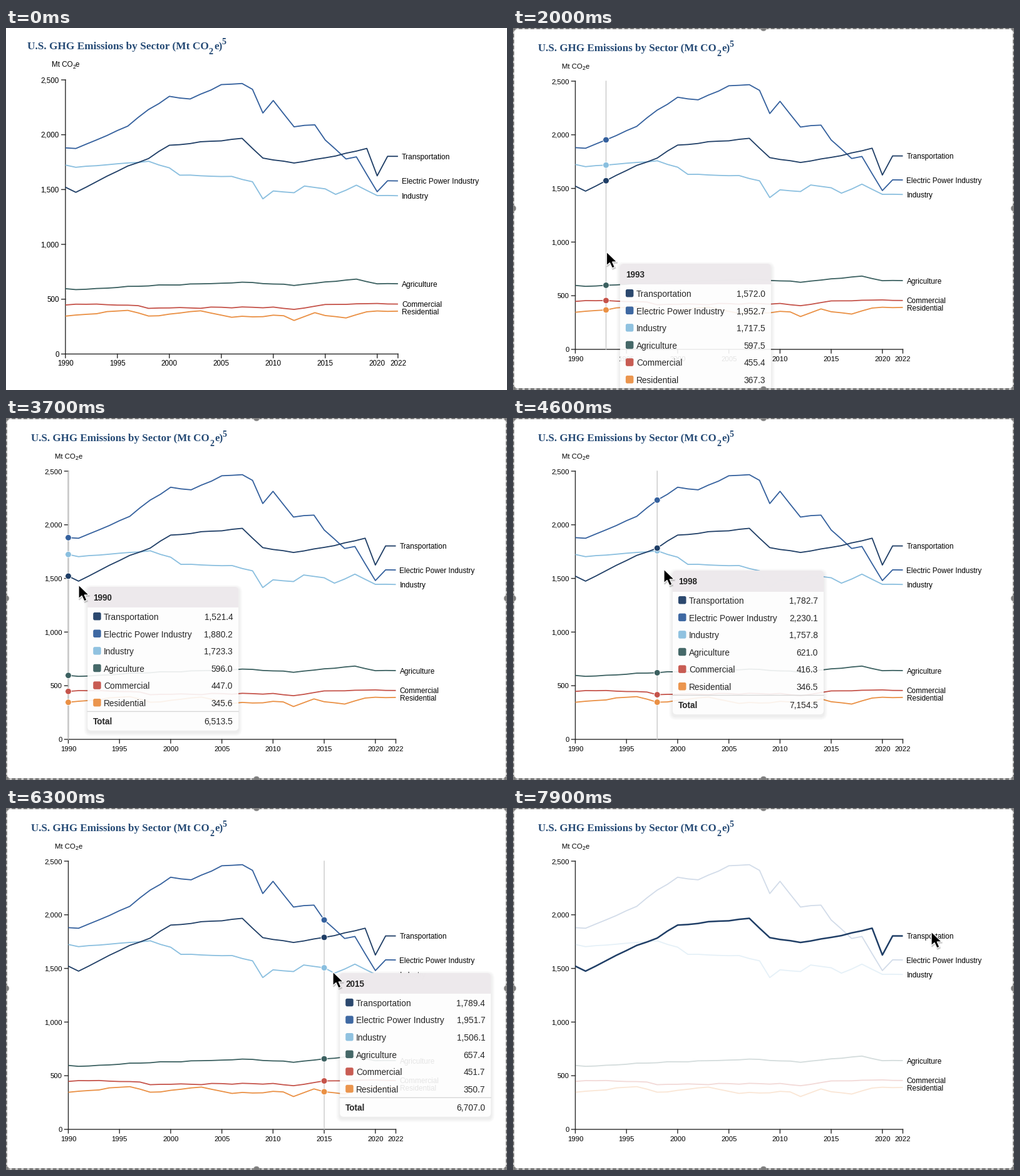
Write a matplotlib script that moves like this. It is 800 px wide and 579 px high and loops after 8 s.

```python
import numpy as np
import matplotlib.pyplot as plt
from matplotlib.animation import FuncAnimation
from matplotlib.patches import Circle, FancyBboxPatch, Polygon, Rectangle

W, H, DPI = 800, 579, 64
PT = 72 / DPI                      # points per pixel
FRAMES, STEP = 80, 100
LEFT, RIGHT, TOP, BOTTOM = 99.5, 622.5, 85, 514
FIRST, LAST = 1990, 2022
YEARS = np.arange(FIRST, LAST + 1)
SANS, SERIF = "Liberation Sans", "Liberation Serif"
rng = np.random.default_rng(5)


def trend(turns):
    """Straight runs between {year: value} turning points, slightly rough in between."""
    values = np.interp(YEARS, list(turns), list(turns.values()))
    rough = rng.normal(0, 3, len(YEARS))
    return np.where(np.isin(YEARS, list(turns)), values, values + rough)


SERIES = [
    ("Transportation", "#1f3e66", trend({
        1990: 1521.4, 1991: 1474.8, 1996: 1714.6, 1998: 1782.73, 2000: 1904, 2007: 1967,
        2009: 1787, 2012: 1742, 2015: 1789.4, 2019: 1875, 2020: 1625, 2021: 1803})),
    ("Electric Power Industry", "#34609d", trend({
        1990: 1880.2, 1991: 1874.4, 1996: 2078.4, 1998: 2230.13, 2000: 2350, 2002: 2326,
        2005: 2457, 2007: 2467, 2008: 2414, 2009: 2198, 2010: 2312, 2012: 2072,
        2014: 2090, 2015: 1951.7, 2017: 1779, 2018: 1798, 2020: 1480, 2021: 1580})),
    ("Industry", "#8abfdf", trend({
        1990: 1723.3, 1991: 1702.9, 1998: 1757.8, 2000: 1698, 2001: 1631, 2006: 1620,
        2008: 1571, 2009: 1415, 2010: 1487, 2012: 1471, 2013: 1532, 2015: 1506.1,
        2016: 1456, 2018: 1540, 2020: 1445})),
    ("Agriculture", "#3b6060", trend({
        1990: 596, 1991: 587.4, 1998: 621, 2007: 655, 2012: 625, 2015: 657.4,
        2018: 683, 2020: 640})),
    ("Commercial", "#c5534a", trend({
        1990: 447, 1991: 454.4, 1997: 441, 1998: 416.3, 2010: 428, 2012: 407,
        2015: 451.7, 2019: 459})),
    ("Residential", "#ea9044", trend({
        1990: 345.6, 1991: 355.3, 1996: 398, 1998: 346.5, 2003: 394, 2006: 335,
        2011: 349, 2012: 306, 2014: 377, 2015: 350.7, 2017: 329, 2019: 385, 2022: 391})),
]

# Where the pointer comes to rest: (time, x, y)
STOPS = [(800, 222, 521), (2600, 124, 301), (2700, 124, 301), (3700, 116, 267),
         (4500, 241, 242), (4600, 241, 242), (6300, 522, 262), (7900, 668, 198)]
TOOLTIP_OFFSET = np.array([14, 2])
ARROW = np.array([(0, 0), (0, 22), (5, 17.5), (9, 26), (13, 24.3), (9.3, 16), (16.5, 16)])

fig = plt.figure(figsize=(W / DPI, H / DPI), dpi=DPI, facecolor="white")
ax = fig.add_axes([0, 0, 1, 1])
zoom = 1.0


def pointer_at(t):
    """Ease in and out between neighbouring stops."""
    t = max(t, STOPS[0][0])
    for (t0, *start), (t1, *end) in zip(STOPS, STOPS[1:]):
        if t <= t1:
            break
    u = min((t - t0) / (t1 - t0), 1)
    return np.array(start) + (np.array(end) - start) * u * u * (3 - 2 * u)


def px(year):
    return LEFT + (year - FIRST) * (RIGHT - LEFT) / (LAST - FIRST)


def py(value):
    return BOTTOM - np.asarray(value) * (BOTTOM - TOP) / 2500


def line(xs, ys, color, width, **kw):
    ax.plot(xs, ys, color=color, lw=width * PT * zoom, snap=False, **kw)


def text(x, y, string, size=11.4, color="black", font=SANS, **kw):
    """Place text with the middle of its capitals at y."""
    ax.text(x, y + 0.36 * size, string, fontsize=size * PT * zoom, color=color,
            fontfamily=font, va="baseline", **kw)


def rounded(x, y, w, h, r, **kw):
    box = FancyBboxPatch((x + r, y + r), w - 2 * r, h - 2 * r,
                         boxstyle=f"round,pad={r}", **kw)
    return ax.add_patch(box)


def draw_title():
    style = dict(color="#254a75", font=SERIF, weight="bold")
    text(40, 31.3, "U.S. GHG Emissions by Sector (Mt CO", 17, **style)
    text(325, 39.5, "2", 14, **style)
    text(333, 31.3, "e)", 17, **style)
    text(345.5, 24.5, "5", 14, **style)
    text(78, 60.7, "Mt CO")
    text(110.5, 64, "2", 8.5)
    text(115, 60.7, "e")


def draw_axes():
    ink = "#2b2b2b"
    line([LEFT, LEFT], [TOP, BOTTOM], ink, 1.4)
    line([LEFT, RIGHT], [BOTTOM, BOTTOM], ink, 1.4)
    for value in range(0, 2501, 500):
        line([LEFT - 6, LEFT], [py(value)] * 2, ink, 1.4)
        text(LEFT - 10, py(value), f"{value:,}", ha="right")
    for year in [*range(FIRST, LAST, 5), LAST]:
        line([px(year)] * 2, [BOTTOM, BOTTOM + 6], ink, 1.4)
        text(px(year), BOTTOM + 14.5, str(year), ha="center")


def draw_series(active=None):
    for name, color, values in reversed(SERIES):
        strong = name == active
        line(px(YEARS), py(values), color, 2.5 if strong else 1.8,
             zorder=3 if strong else 2, alpha=0.22 if active and not strong else 1,
             solid_joinstyle="round", solid_capstyle="butt")
        text(RIGHT + 6, py(values[-1]) + 0.4, name, 11.8)


def draw_marker(year):
    x = px(year)
    line([x, x], [TOP, BOTTOM], "#c9c9c9", 1.4, zorder=2.5)
    for _, color, values in reversed(SERIES):
        ax.add_patch(Circle((x, py(values[year - FIRST])), 4.9, fc=color, ec="white",
                            lw=0.9 * PT, zorder=4))


def draw_tooltip(x, y, year):
    w, h = 241, 230
    for grow in range(6, 0, -1):
        rounded(x - grow, y - grow + 3, w + 2 * grow, h + 2 * grow, 5 + grow,
                fc="black", ec="none", alpha=0.01, zorder=5)
    body = rounded(x, y, w, h, 6, fc="white", ec="none", alpha=0.9, zorder=5.1)
    header = Rectangle((x, y), w, 33.5, fc="#ece8eb", ec="none", alpha=0.93, zorder=5.2)
    ax.add_patch(header)
    header.set_clip_path(body)

    ink = dict(color="#262626", zorder=6)
    text(x + 9, y + 17, str(year), 13.5, weight="bold", **ink)
    for i, (name, color, values) in enumerate(SERIES):
        row = y + 48 + 27.6 * i
        rounded(x + 9, row - 7, 12.5, 12.5, 2.5, fc=color, ec="none", alpha=0.95, zorder=6)
        text(x + 26, row, name, 13.8, **ink)
        text(x + w - 9, row, f"{values[year - FIRST]:,.1f}", 13.8, ha="right", **ink)
    total = sum(values[year - FIRST] for _, _, values in SERIES)
    line([x, x + w], [y + 199.5] * 2, "#d6d6d6", 1.3, zorder=6)
    text(x + 9, y + 215.4, "Total", 13.5, weight="bold", **ink)
    text(x + w - 9, y + 215.4, f"{total:,.1f}", 13.8, ha="right", **ink)


def draw_pointer(tip):
    for shift, alpha in ((2.2, 0.07), (1.2, 0.1)):
        ax.add_patch(Polygon(ARROW + tip + (shift / 2, shift), fc="black", ec="black",
                             lw=2.5, alpha=alpha, zorder=8))
    ax.add_patch(Polygon(ARROW + tip, fc="black", ec="white", lw=1.3 * PT,
                         joinstyle="round", zorder=9))


def draw_frame():
    edges = [([x, x], [0, H]) for x in (0.5, W - 0.5)]
    edges += [([0, W], [y, y]) for y in (0.5, H - 1.5)]
    for xs, ys in edges:
        line(xs, ys, "#bdbdbd", 2.6, zorder=10)
        line(xs, ys, "#707070", 2.6, zorder=10, dashes=(2.2, 1.4))
    mid_x, mid_y = W / 2, H / 2 - 1
    for x in (0, mid_x, W):
        for y in (0, mid_y, H - 1):
            if (x, y) != (mid_x, mid_y):
                ax.add_patch(Circle((x, y), 4.8, fc="#7d7d7d", ec="#a5a5a5",
                                    lw=0.8, zorder=11))


def set_view(wide):
    """The opening view is slightly enlarged and has no selection frame."""
    global zoom
    sx, sy, zoom = (1.0153, 1.022, 1.017) if wide else (1, 1, 1)
    top = TOP - 83 / sy if wide else 0
    ax.clear()
    ax.axis("off")
    ax.set_xlim(W / 2 - W / 2 / sx, W / 2 + W / 2 / sx)
    ax.set_ylim(top + H / sy, top)
    ax.set_autoscale_on(False)


def draw(frame):
    t = frame * STEP
    set_view(wide=frame == 0)
    draw_title()
    draw_axes()
    tip, trailing = pointer_at(t), pointer_at(t - STEP)
    on_label = tip[0] > RIGHT + 6
    draw_series("Transportation" if on_label else None)
    if t >= STOPS[0][0]:
        if not on_label and trailing[1] < BOTTOM:
            position = (trailing[0] - 2 - LEFT) / (RIGHT - LEFT)
            year = FIRST + int(position * (LAST - FIRST))
            draw_marker(year)
            draw_tooltip(*(trailing + TOOLTIP_OFFSET), year)
        draw_pointer(tip)
    if frame:
        draw_frame()
    return []


animation = FuncAnimation(fig, draw, frames=FRAMES, interval=STEP, init_func=lambda: [],
                          repeat=True, repeat_delay=0)
plt.show()
```
